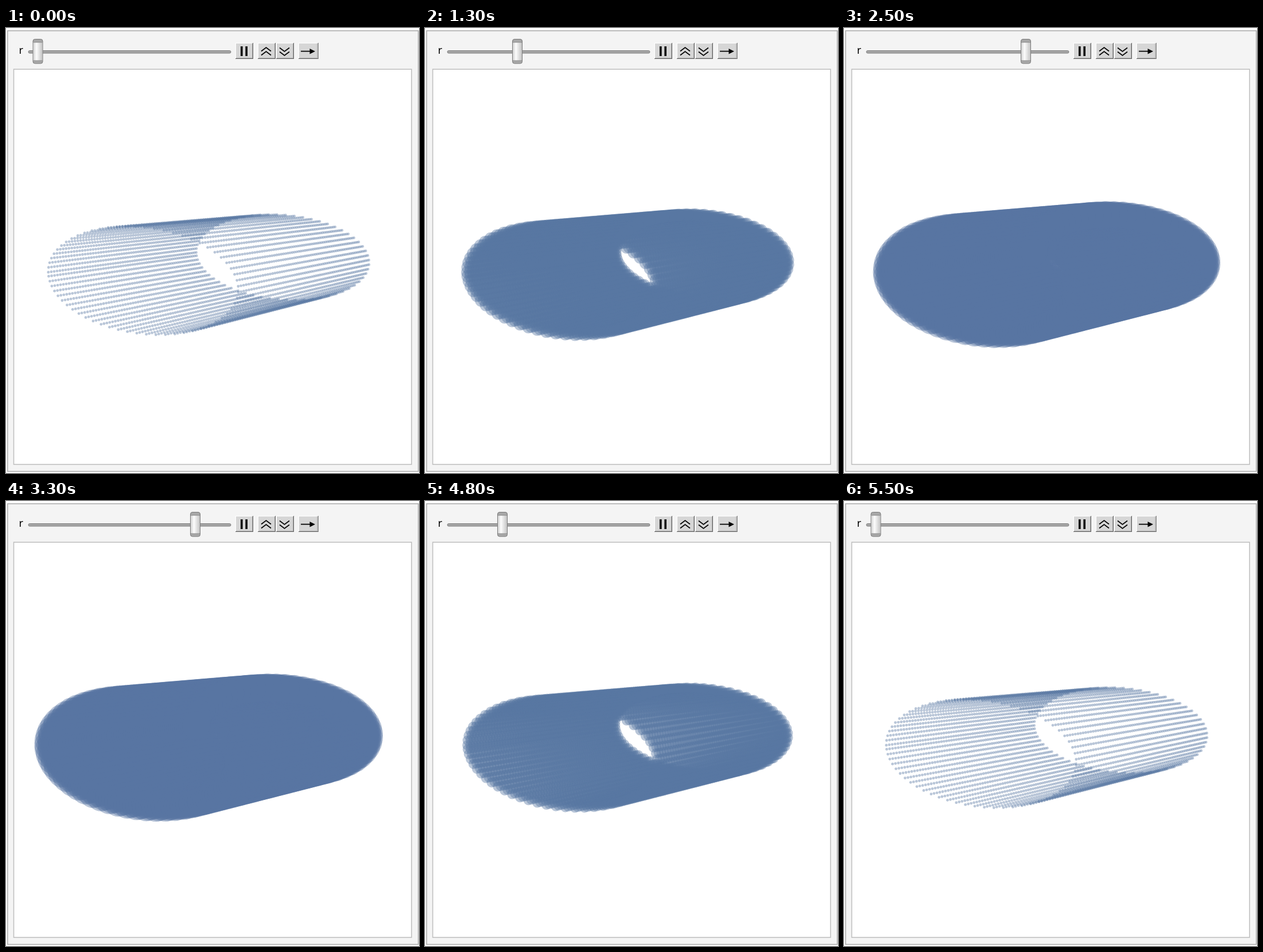
These frames come from a looping animation (720 px wide and 777 px high, 6000 ms). An HTML page with a canvas:

```html
<!DOCTYPE html>
<html lang="en">
<head>
<meta charset="utf-8">
<title>Point cylinder</title>
<style>
  html, body { margin: 0; width: 100%; height: 100%; overflow: hidden; background: #fff; }
  svg, canvas { position: absolute; left: 0; top: 0; width: 720px; height: 777px; display: block; }
  text { font: 18px "Noto Sans", "Open Sans", sans-serif; }
</style>
</head>
<body>
<svg viewBox="0 0 720 777">
  <defs>
    <linearGradient id="body" x2="1" y2="0">
      <stop offset="0" stop-color="#d2d2d2"/>
      <stop offset=".35" stop-color="#fcfcfc"/>
      <stop offset="1" stop-color="#c4c4c4"/>
    </linearGradient>
    <g id="face">
      <rect width="31" height="28" fill="#646464"/>
      <rect width="30" height="27" fill="#fff"/>
      <rect x="1" y="1" width="29" height="26" fill="#a4a4a4"/>
      <rect x="1" y="1" width="28" height="25" fill="#d6d6d6"/>
    </g>
  </defs>
  <rect x="2.75" y="4.75" width="716" height="769.5" fill="#f4f4f4" stroke="#a9a9a9" stroke-width="1.5"/>
  <rect x="13.5" y="72" width="693.5" height="690" fill="#fff" stroke="#bdbdbd" stroke-width="1.5"/>
  <text x="22.5" y="45">r</text>
  <rect x="39" y="39.5" width="353" height="4.5" rx="2.25" fill="#a6a6a6" stroke="#7c7c7c"/>
  <g id="thumb">
    <rect x="-8.5" y="19.5" width="17" height="42.5" rx="3.5" fill="#a8a8a8" stroke="#7a7a7a"/>
    <rect x="-8" y="25" width="16" height="32" fill="url(#body)"/>
    <path d="M-8 25H8M-8 57H8" stroke="#8a8a8a" fill="none"/>
  </g>
  <use href="#face" transform="translate(400 26)"/>
  <use href="#face" transform="translate(439 26)"/>
  <use href="#face" transform="translate(471 26)"/>
  <use href="#face" transform="translate(510 26) scale(1.12 1)"/>
  <path d="M409 32h3.6v17h-3.6zM417.4 32h3.6v17h-3.6zM529.5 36L539 40.7L529.5 45.4Z"/>
  <path d="M445 40.5L453.500 34L462 40.5M445 47.5L453.500 41L462 47.5M477 34.5L485.500 41L494 34.500M477 41.500L485.500 48L494 41.500M514 40.700H532" fill="none" stroke="#000" stroke-width="1.7"/>
</svg>
<canvas width="720" height="777"></canvas>
<script>
const ctx = document.querySelector('canvas').getContext('2d');
const thumb = document.getElementById('thumb');
const MIN_X = 55.5;

// Near rim of the tube in perspective, plus the vanishing point of its axis.
const rim = { x: 239.5, y: 441, a: 165.7, shear: 16, b: 93.2 };
const vanish = { x: 1430, y: 245 };
const tilt = 0.098, depth = 0.2576;
const LINES = 63, DOTS = 63;

function project(angle, s) {
  const c = Math.cos(angle), w = 1 - tilt * c;
  const u = (c - tilt) / w;
  const v = Math.sqrt(1 - tilt * tilt) * Math.sin(angle) / w;
  const x = rim.x + rim.a * u;
  const y = rim.y + rim.shear * u + rim.b * v;
  const k = depth * s;
  return [(x * w + vanish.x * k) / (w + k), (y * w + vanish.y * k) / (w + k)];
}

const points = [];
for (let i = 0; i < LINES; i++)
  for (let j = 0; j < DOTS; j++)
    points.push(project(3.042 - 0.1 * i, j / (DOTS - 1)));

// The slider runs up, rests one beat at the top and runs back.
function sliderX(step) {
  if (step < 5 || step > 54) return MIN_X;
  return 57 + 13 * (step < 30 ? step - 5 : 54 - step);
}

function draw(x) {
  const radius = 2.4 + 0.0805 * (x - MIN_X);
  thumb.setAttribute('transform', `translate(${x} 0)`);
  ctx.clearRect(0, 0, 720, 777);
  ctx.fillStyle = 'rgba(88,118,162,.42)';
  for (const [px, py] of points) {
    ctx.beginPath();
    ctx.arc(px, py, radius, 0, 2 * Math.PI);
    ctx.fill();
  }
}

const start = performance.now();
let shown = null;
function tick() {
  const t = Math.max(0, performance.now() - start) % 6000;
  const x = sliderX(Math.floor(t / 100));
  if (x !== shown) draw(shown = x);
  requestAnimationFrame(tick);
}
tick();
</script>
</body>
</html>
```
